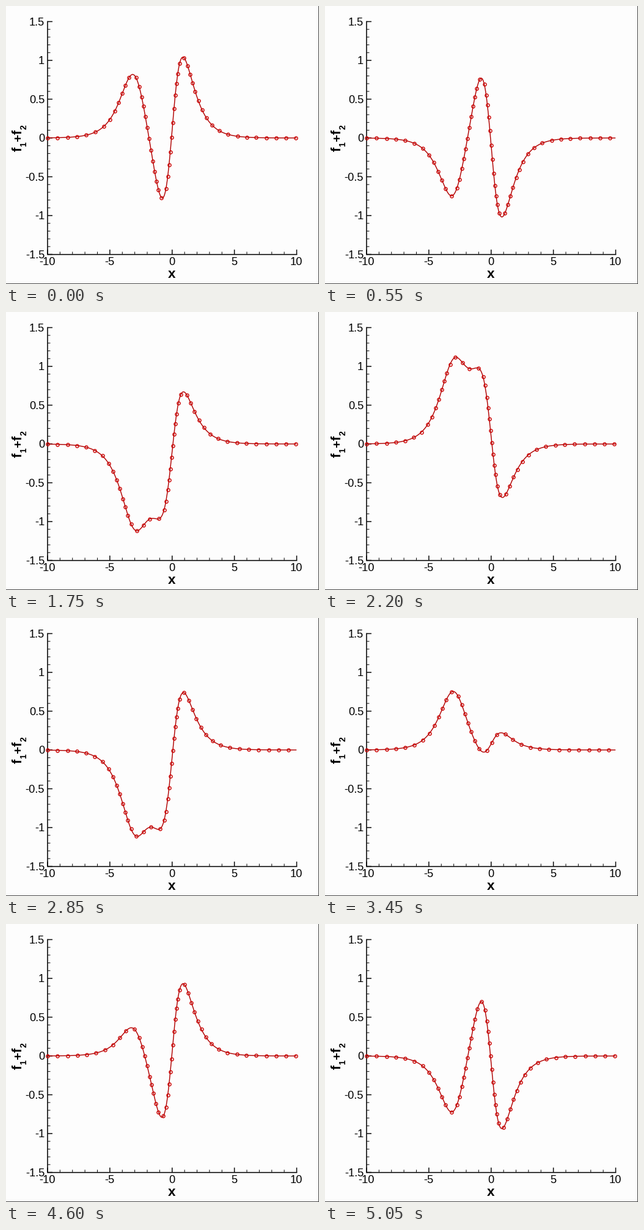
A matplotlib script that plays this animation: 512x455 px, repeating every 5100 ms.

```python
import numpy as np
import matplotlib.pyplot as plt
from matplotlib.animation import FuncAnimation

W, H, DPI = 512, 455, 100
FRAMES, INTERVAL = 102, 50
PT = 72 / DPI                      # points per pixel
LEFT, RIGHT, TOP, BOTTOM = 68, 475.5, 25.5, 406.5
SPACING = 0.03                     # symbol spacing as a share of the frame

plt.rcParams["font.family"] = "Liberation Sans"
fig = plt.figure(figsize=(W / DPI, H / DPI), dpi=DPI, facecolor="#fdfdfd")
ax = fig.add_axes([0, 0, 1, 1])
ax.set_xlim(0, W)
ax.set_ylim(H, 0)
ax.axis("off")


def px(x):
    return LEFT + (x + 10) * (RIGHT - LEFT) / 20


def py(y):
    return TOP + (1.5 - y) * (BOTTOM - TOP) / 3


def stroke(xs, ys, width, color="#080808"):
    ax.plot(xs, ys, color=color, lw=width * PT, solid_capstyle="butt",
            snap=False)


def label(x, y, s, size, **kw):
    ax.text(x, y, s, fontsize=size * PT, color="black", **kw)


def draw_axes():
    base = BOTTOM + 0.2
    stroke([LEFT, LEFT], [TOP - 0.8, base + 0.8], 1.6)
    stroke([LEFT, RIGHT + 0.8], [base, base], 1.6)
    for i in range(21):
        x, major = px(i - 10), i % 5 == 0
        stroke([x, x], [base, base - (8 if major else 4.5)],
               1.5 if major else 1)
        if major:
            label(x - 0.6, 423.8, f"{i - 10}", 18.3,
                  ha="center", va="baseline")
    for i in range(31):
        v = (i - 15) / 10
        y, major = py(v), i % 5 == 0
        stroke([LEFT, LEFT + (8 if major else 4.5)], [y, y],
               1.5 if major else 1)
        if major:
            label(63.2, y + 6.3, f"{v:g}", 18.3, ha="right", va="baseline")


def draw_titles():
    label(271, 444.7, "x", 22.5, weight="bold", ha="center", va="baseline")
    pieces = [("f", 237.5, 26, 22), ("1", 230, 33, 14), ("+", 222.5, 26, 21),
              ("f", 209.7, 26, 22), ("2", 202.2, 33, 14)]
    for s, y, x, size in pieces:
        label(x, y, s, size, weight="bold", rotation=90,
              rotation_mode="anchor", ha="left", va="baseline")


draw_axes()
draw_titles()
stroke([W - 0.5, W - 0.5], [0, H], 1, "#484848")
stroke([0, W], [H - 0.5, H - 0.5], 1, "#484848")

x = np.linspace(-10, 10, 400, endpoint=False)
mode1 = 1 / np.cosh(x + 3)
mode2 = 2 * np.tanh(x) / np.cosh(x)
xs = px(x)

curve, = ax.plot([], [], color="#b00404", lw=1.45 * PT)
symbols, = ax.plot([], [], "o", ms=5.2 * PT, mfc="none",
                   mec="#cc0404", mew=1.4 * PT, snap=False)


def spaced(ys):
    """Indices of samples at least SPACING apart along the curve."""
    picks, run = [0], 0.0
    # lengths are relative to the inside of the 1 px frame border
    steps = np.hypot(np.diff(xs) / (W - 2), np.diff(ys) / (H - 2))
    for i, step in enumerate(steps, 1):
        run += step
        if run >= SPACING:
            picks.append(i)
            run = 0.0
    return picks


def update(n):
    # short hold at the start, then two time samples per frame
    t = max(2 * n - 3, n / 2) * 4 * np.pi / 200
    ys = py(np.cos(2.3 * t) * mode1 + np.cos(2.8 * t) * mode2)
    picks = spaced(ys)
    curve.set_data(xs, ys)
    symbols.set_data(xs[picks], ys[picks])
    return curve, symbols


anim = FuncAnimation(fig, update, frames=FRAMES, interval=INTERVAL,
                     repeat=True, repeat_delay=0)
plt.show()
```
